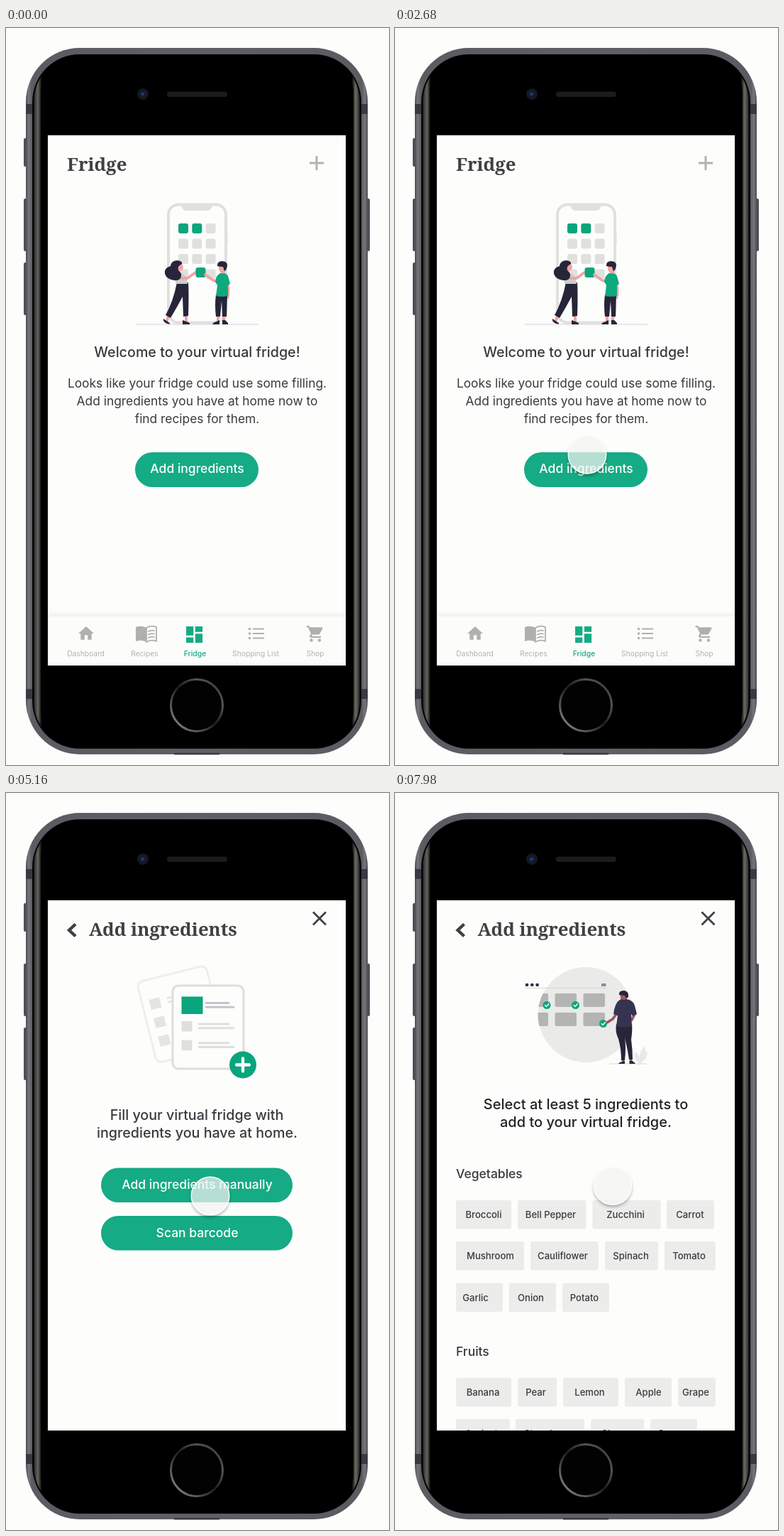
These frames come from a looping animation (540 px wide and 1037 px high, 8 s). An HTML page:

```html
<!DOCTYPE html>
<html lang="en">
<head>
<meta charset="utf-8">
<title>Virtual fridge</title>
<style>
html, body { margin: 0; width: 100%; height: 100%; overflow: hidden; background: #fdfdfc; }
svg { display: block; width: 540px; height: 1037px; }
text { font-family: Inter, "Open Sans", sans-serif; fill: #3b393d; }
.mid text, text.mid { text-anchor: middle; }
.title { font: 600 25.8px "Noto Serif", serif; fill: #413f40; }
.head { font-size: 19.7px; font-weight: 500; }
.dark { font-size: 20px; fill: #222124; }
.body { font-size: 17.35px; }
.btn { font-size: 17.5px; font-weight: 500; fill: #fff; }
.tab { font-size: 10.4px; font-weight: 300; fill: #a0a0a0; }
.group { font-size: 17.5px; font-weight: 500; }
.chip { font-size: 13.1px; font-weight: 500; }
.line { fill: none; stroke-linecap: round; stroke-linejoin: round; }
</style>
</head>
<body>
<svg viewBox="0 0 540 1037">
<defs>
  <linearGradient id="metal" x2="1" y2="0">
    <stop offset="0" stop-color="#4b4a51"/><stop offset=".008" stop-color="#77767d"/>
    <stop offset=".018" stop-color="#5c5b62"/><stop offset=".5" stop-color="#605f67"/>
    <stop offset=".982" stop-color="#5c5b62"/><stop offset=".992" stop-color="#77767d"/>
    <stop offset="1" stop-color="#4b4a51"/>
  </linearGradient>
  <linearGradient id="rim" x2="1" y2="0">
    <stop offset="0" stop-color="#2a2a2b"/><stop offset=".012" stop-color="#65655f"/>
    <stop offset=".024" stop-color="#000"/><stop offset=".976" stop-color="#000"/>
    <stop offset=".988" stop-color="#6c6b64"/><stop offset="1" stop-color="#2a2a2b"/>
  </linearGradient>
  <linearGradient id="ring" x1="0" y1="1" x2="1" y2="0">
    <stop offset="0" stop-color="#9a9a9a"/><stop offset=".3" stop-color="#4a4a4a"/>
    <stop offset=".5" stop-color="#1c1c1c"/><stop offset=".75" stop-color="#555"/>
    <stop offset="1" stop-color="#333"/>
  </linearGradient>
  <linearGradient id="fade" x2="0" y2="1">
    <stop offset="0" stop-color="#f3f3ee" stop-opacity="0"/><stop offset="1" stop-color="#f1f1ea"/>
  </linearGradient>
  <filter id="soft" x="-50%" y="-50%" width="200%" height="200%"><feGaussianBlur stdDeviation="2.2"/></filter>
  <clipPath id="glass"><rect x="59" y="151" width="420" height="746"/></clipPath>
  <clipPath id="disc"><circle cx="269" cy="312" r="67.500"/></clipPath>
  <clipPath id="around"><path clip-rule="evenodd" d="M-45-45H45V45H-45zM-27 0a27 27 0 0 0 54 0a27 27 0 0 0-54 0z"/></clipPath>
</defs>

<rect width="540" height="1037" fill="#fdfdfc"/>

<!-- phone -->
<g fill="#504f57">
  <rect x="25" y="155" width="5" height="40" rx="2"/>
  <rect x="25" y="240" width="5" height="74" rx="2"/>
  <rect x="25" y="330" width="5" height="74" rx="2"/>
  <rect x="508" y="240" width="5" height="74" rx="2"/>
</g>
<rect x="28" y="28" width="482" height="994" rx="76" fill="url(#metal)"/>
<g fill="#3a3943">
  <rect x="28" y="107" width="10" height="14"/><rect x="500" y="107" width="10" height="14"/>
  <rect x="28" y="930" width="10" height="14"/><rect x="500" y="930" width="10" height="14"/>
  <rect x="237" y="1020" width="64" height="2.500"/>
</g>
<rect x="37" y="37" width="464" height="977" rx="67" fill="#060606"/>
<rect x="39.500" y="38" width="459" height="975" rx="65" fill="url(#rim)"/>
<rect x="49" y="37.500" width="441" height="976" rx="56" fill="#000"/>
<circle cx="193" cy="93" r="8" fill="#17171c"/>
<circle cx="193" cy="93" r="4.500" fill="#131d40"/>
<circle cx="192.500" cy="93" r="2" fill="#23417f"/>
<rect x="227" y="89.500" width="85" height="7.500" rx="3.700" fill="#1d1b1a"/>
<circle cx="269" cy="953" r="36.500" fill="#020202" stroke="url(#ring)" stroke-width="3"/>
<rect x="58" y="150" width="422" height="748" fill="#101009"/>
<rect x="59" y="151" width="420" height="746" fill="#fdfdfc"/>

<g clip-path="url(#glass)">
<!-- fridge -->
<g id="s0">
  <rect x="59" y="151" width="420" height="746" fill="#fdfdfc"/>
  <text class="title" x="86" y="200.500">Fridge</text>
  <path class="line" style="stroke-linecap:butt" d="M428 190h20M438 180v20" stroke="#b2b2b0" stroke-width="3"/>

  <rect x="310" y="287" width="2.500" height="18" rx="1" fill="#dededd"/>
  <rect x="229" y="248.500" width="81" height="166" rx="14" fill="#fdfdfc" stroke="#e0e0df" stroke-width="4"/>
  <path d="M247 248h44q-1 9-8 9h-28q-7 0-8-9z" fill="#e0e0df"/>
  <g id="tiles"></g>
  <path d="M183 417h173" stroke="#d3d1dc" stroke-width="1"/>

  <g id="woman">
    <path class="line" d="M230 403l-3 8M254 405v8" stroke="#f2a3a5" stroke-width="4"/>
    <path d="M222 409q4 3 9 6v1.500q-6 0-9-4.500zM249 411l5 2 5 2v2h-10z" fill="#272539"/>
    <path d="M241 358h16q1 18 0 47l-7 1-1-28q-8 15-17 30l-7-4q11-20 16-46z" fill="#272539"/>
    <path d="M242 346q6-3 11 3 3 5 3 11h-17q0-9 3-14z" fill="#cfcdca"/>
    <path class="line" d="M246 352l10 0 11-8" stroke="#f2a3a5" stroke-width="4"/>
    <circle cx="244.500" cy="336.500" r="5.500" fill="#f2a3a5"/>
    <path d="M248 332q1-4-6-5-9 0-10 8-10 3-8 11 3 8 13 9 9 1 10-6 1-4-4-8-2-6 5-9z" fill="#272539"/>
  </g>
  <rect x="267.500" y="337" width="14" height="14" rx="3" fill="#0aa57c"/>
  <g id="man">
    <path class="line" d="M301 358l-9-3-11-8M312.500 360q2 10 0 19" stroke="#f2a3a5" stroke-width="3.800"/>
    <path class="line" d="M299 404v9M307 404v9" stroke="#f2a3a5" stroke-width="4"/>
    <path d="M301 411v6h-10q1-3 6-4zM305 411h4l4 4v2h-8z" fill="#272539"/>
    <path d="M296 375h16l-1 31h-6l-1-22-2 22h-6q-2-16 0-31z" fill="#272539"/>
    <path d="M302 345q8-1 11 4l3 11-3 2v15q-9 2-17 0l2-15-3-5q1-9 7-12z" fill="#0fa97f"/>
    <path d="M300 334h9v10q-4 3-6 0-4-3-3-10z" fill="#f2a3a5"/>
    <path d="M298 335q-1-6 6-7 8 0 8 6-1 7-4 8l-2-6q-4 0-8-1z" fill="#272539"/>
  </g>

  <g class="mid">
    <text class="head" x="269.500" y="463">Welcome to your virtual fridge!</text>
    <text class="body" x="269.500" y="505.500">Looks like your fridge could use some filling.</text>
    <text class="body" x="269.500" y="530.500">Add ingredients you have at home now to</text>
    <text class="body" x="269.500" y="555.500">find recipes for them.</text>
    <rect x="182" y="597" width="174" height="49" rx="24.500" fill="#15ab84"/>
    <text class="btn" x="269.500" y="626">Add ingredients</text>
  </g>

  <rect x="59" y="820" width="420" height="8" fill="url(#fade)"/>
  <rect x="59" y="828" width="420" height="69" fill="#fcfcfb"/>
  <g fill="#b0b0ae">
    <path transform="translate(99.800 838.800) scale(1.100)" d="M10 20v-6h4v6h5v-8h3L12 3 2 12h3v8z"/>
    <path d="M183 843q8-3 15 1v20q-7-4-15-1z"/>
    <path class="line" d="M198 844q7-4 14 -1v20q-7-3-14 1zM201 849q4-2 8-1M201 853.500q4-2 8-1M201 858q4-2 8-1" stroke="#b0b0ae" stroke-width="1.800"/>
    <path fill="#15ab84" transform="translate(250.200 838.200) scale(1.280)" d="M3 13h8V3H3zM3 21h8v-6H3zM13 21h8V11h-8zM13 3v6h8V3z"/>
    <path d="M348 844.500h16v2h-16zM348 851h16v2h-16zM348 857.500h16v2h-16z"/>
    <circle cx="343.500" cy="845.500" r="1.800"/><circle cx="343.500" cy="852" r="1.800"/><circle cx="343.500" cy="858.500" r="1.800"/>
    <path transform="translate(422.500 838.800) scale(1.130)" d="M1 2v2h2l3.600 7.600-1.400 2.400q-1 2.500 1.800 3h12v-2H7.400l.9-1.900h7.500q1.200 0 1.700-1l3.600-6.500q.5-1.500-1-1.600H5.200L4.300 2z"/>
    <circle cx="430.500" cy="861.500" r="2.200"/><circle cx="442" cy="861.500" r="2.200"/>
  </g>
  <g class="mid">
    <text class="tab" x="112.500" y="883.500">Dashboard</text>
    <text class="tab" x="195.500" y="883.500">Recipes</text>
    <text class="tab" x="266.500" y="883.500" style="fill:#15ab84;font-weight:500">Fridge</text>
    <text class="tab" x="352" y="883.500">Shopping List</text>
    <text class="tab" x="436" y="883.500">Shop</text>
  </g>
</g>

<!-- add ingredients -->
<g id="s1">
  <rect x="59" y="151" width="420" height="746" fill="#fdfdfc"/>
  <g id="bar">
    <path class="line" style="stroke-linecap:butt;stroke-linejoin:miter" d="M98 184.500l-9 8.500 9 8.500" stroke="#413f40" stroke-width="4.400"/>
    <text class="title" x="117" y="200.500">Add ingredients</text>
    <path class="line" style="stroke-linecap:butt" d="M433 167.500l18 18M451 167.500l-18 18" stroke="#413f40" stroke-width="2.700"/>
  </g>
  <g id="papers"></g>
  <circle cx="334" cy="382.500" r="19" fill="#0aa57c"/>
  <path class="line" d="M325 382.500h18M334 373.500v18" stroke="#fff" stroke-width="4.300"/>
  <g class="mid">
    <text class="head" x="269" y="460">Fill your virtual fridge with</text>
    <text class="head" x="269.500" y="485">ingredients you have at home.</text>
    <rect x="134" y="527.500" width="270" height="48.500" rx="24.200" fill="#15ab84"/>
    <text class="btn" x="269.500" y="556.500">Add ingredients manually</text>
    <rect x="134" y="595" width="270" height="48.500" rx="24.200" fill="#15ab84"/>
    <text class="btn" x="269.500" y="624.500">Scan barcode</text>
  </g>
</g>

<!-- ingredient list -->
<g id="s2">
  <rect x="59" y="151" width="420" height="746" fill="#fdfdfc"/>
  <use href="#bar" x="-.5"/>
  <circle cx="269" cy="312" r="67" fill="#eaeae9"/>
  <path d="M183 274.500h115" stroke="#d6d6d8" stroke-width="1"/>
  <g fill="#302e44"><circle cx="186" cy="270" r="2.300"/><circle cx="193.300" cy="270" r="2.300"/><circle cx="200.600" cy="270" r="2.300"/></g>
  <rect x="291" y="268" width="6.500" height="4" fill="#8d8c94"/>
  <g id="boxes" clip-path="url(#disc)"></g>
  <g id="checks"></g>
  <path d="M302 381h53" stroke="#d6d6d8" stroke-width="1"/>
  <path d="M343 380q-8-8-4-16 6 4 6 11-1-13 8-19-1 7 3 10-1 9-10 14z" fill="#e9e9e8"/>
  <path class="line" d="M312 311l-5 7-8 5M338 311l-4 8" stroke="#a0575f" stroke-width="3.800"/>
  <path class="line" d="M321.500 374v4M332.500 374v4" stroke="#a0575f" stroke-width="3.500"/>
  <path d="M324 377v4h-9q1-2 6-3zM330.500 377h4l4 3v1h-8z" fill="#272539"/>
  <path d="M312 325h22q1 8-1 22 2 14 2 28h-5q-2-14-5-26l-1-6q2 16 0 33h-5q0-16-4-30-5-10-3-21z" fill="#272539"/>
  <path d="M318 284h9v9h-9z" fill="#a0575f"/>
  <path d="M317 291q7-2 13 0 6 2 8 8l3 12-6 3-2-3 1 17q-10 3-22 0l2-15-6-2q2-16 9-20z" fill="#353350"/>
  <path d="M317 283q7-2 11 1-1 6-5 7-5 0-6-8z" fill="#a0575f"/>
  <path d="M316 284q-1-6 7-6 7 1 6 9l-3 2-2-4z" fill="#272539"/>
  <g class="mid">
    <text class="head dark" x="269" y="445">Select at least 5 ingredients to</text>
    <text class="head dark" x="269" y="470">add to your virtual fridge.</text>
  </g>
  <text class="group" x="86" y="541.500">Vegetables</text>
  <text class="group" x="86" y="791.500">Fruits</text>
  <g id="chips" class="mid"></g>
</g>
</g>

<!-- touch point -->
<g id="touch">
  <g clip-path="url(#around)"><circle id="shade" cy="3" r="27" filter="url(#soft)"/></g>
  <circle id="dot" r="26.800" stroke="#fff" stroke-width="1.400"/>
</g>
</svg>
<script>
const LOOP = 8000;
const $ = id => document.getElementById(id);
const box = (x, y, w, h, r, fill) =>
  `<rect x="${x}" y="${y}" width="${w}" height="${h}" rx="${r}" fill="${fill}"/>`;

// app tiles on the drawn phone
let out = '';
for (let r = 0; r < 4; r++)
  for (let c = 0; c < 3; c++)
    if (r < 3 || c !== 1)
      out += box(243 + c * 19.3, 275 + r * 21.5, 14, 14, 3, r === 0 && c < 2 ? '#0aa57c' : '#e0e0df');
$('tiles').innerHTML = out;

// two sheets sharing one layout
function sheet(place, edge, ink, left, drop, hasTop) {
  let s = `<g transform="${place}"><rect width="100" height="117" rx="8" fill="#fdfdfc" stroke="${edge}" stroke-width="3"/>`;
  for (let i = 0; i < 3; i++) {
    const y = drop + i * 26.7, top = hasTop && i === 0;
    s += top ? box(12.5, 15.5, 30, 24.5, 0, '#0aa57c') : box(left, y, 15, 14.5, 0, ink);
    const x = top ? 47 : 37, ly = top ? 24.5 : y + 4;
    s += `<path class="line" d="M${x} ${ly}H79M${x} ${ly + 5.7}H86" stroke="${top ? '#c5c4cd' : ink}" stroke-width="3"/>`;
  }
  return s + '</g>';
}
$('papers').innerHTML =
  sheet('translate(184.500 266.500) rotate(-14)', '#eeeeed', '#e4e4e2', 10.5, 28, false) +
  sheet('translate(235 271)', '#deded8', '#dfdfdb', 12.5, 23.3, true);

out = '';
for (const y of [282, 309])
  for (const x of [185.500, 225.500, 265.500]) out += box(x, y, 30.5, 19, 2, '#b4b4b3');
$('boxes').innerHTML = out;
$('checks').innerHTML = [[214, 298.5], [254.5, 298.5], [293.5, 324.5]].map(([x, y]) =>
  `<circle cx="${x}" cy="${y}" r="5.500" fill="#0aa57c"/>
   <path class="line" d="M${x - 2.5} ${y}l2 2 3.500-4" stroke="#fff" stroke-width="1.300"/>`).join('');

// rows of chips: name, left, width, text centre
const rows = [
  [573, ['Broccoli', 86, 78, 125], ['Bell Pepper', 173, 96.5, 219.5], ['Zucchini', 278.5, 96, 325], ['Carrot', 383, 67, 416]],
  [631, ['Mushroom', 86, 96, 134.5], ['Cauliflower', 191, 96, 236.5], ['Spinach', 296, 75, 332.5], ['Tomato', 380, 72, 414.5]],
  [689.5, ['Garlic', 86, 66, 113.5], ['Onion', 160.5, 66.5, 191.5], ['Potato', 236, 66, 267]],
  [823, ['Banana', 86, 78, 124], ['Pear', 173, 55, 198.5], ['Lemon', 237, 78, 274.5], ['Apple', 324, 66, 357.5], ['Grape', 399, 53, 424]],
  [881, ['Apricot', 86, 76, 122], ['Strawberry', 170, 97, 217], ['Cherry', 276, 75, 312], ['Orange', 360, 66, 393]]
];
$('chips').innerHTML = rows.map(([y, ...items]) => items.map(([name, x, w, mid]) =>
  box(x, y, w, 40.5, 3, '#ececeb') + `<text class="chip" x="${mid}" y="${y + 25}">${name}</text>`).join('')).join('');

// motion
const clamp = v => Math.max(0, Math.min(1, v));
const smooth = v => v * v * (3 - 2 * v);
const ramp = (t, a, b) => smooth(clamp((t - a) / (b - a)));
const pulse = (t, a, b) => ramp(t, a, a + 100) * (1 - ramp(t, b, b + 120));

const path = [
  [1080, 580, 716], [1760, 330, 640], [2560, 271, 600], [3300, 271, 602], [4000, 271, 611],
  [4460, 271, 611], [5160, 288, 567], [5760, 292, 549], [7240, 292, 549], [7960, 307, 552.5]
];
function spot(t) {
  if (t <= path[0][0]) return [path[0][1], path[0][2]];
  for (let i = 1; i < path.length; i++) {
    const [a, x, y] = path[i - 1], [b, u, v] = path[i];
    if (t < b) {
      const k = (t - a) / (b - a), e = i === 1 ? k : i === 2 ? 1 - (1 - k) ** 2 : smooth(k);
      return [x + (u - x) * e, y + (v - y) * e];
    }
  }
  return path[path.length - 1].slice(1);
}

function draw(t) {
  $('s1').style.opacity = ramp(t, 2960, 3240);
  $('s2').style.opacity = ramp(t, 7260, 7560);
  const [x, y] = spot(t);
  const press = Math.max(pulse(t, 2760, 2920), pulse(t, 7040, 7220));
  $('touch').setAttribute('transform', `translate(${x} ${y})`);
  $('touch').style.display = t < path[0][0] ? 'none' : '';
  $('shade').setAttribute('opacity', .3 * (1 - press));
  $('dot').setAttribute('fill', press > .5 ? '#fff' : '#f4f4f2');
  $('dot').setAttribute('fill-opacity', .72 - .32 * press);
}

const start = performance.now();
function tick() {
  draw((performance.now() - start) % LOOP);
  requestAnimationFrame(tick);
}
draw(0);
requestAnimationFrame(tick);
</script>
</body>
</html>
```
